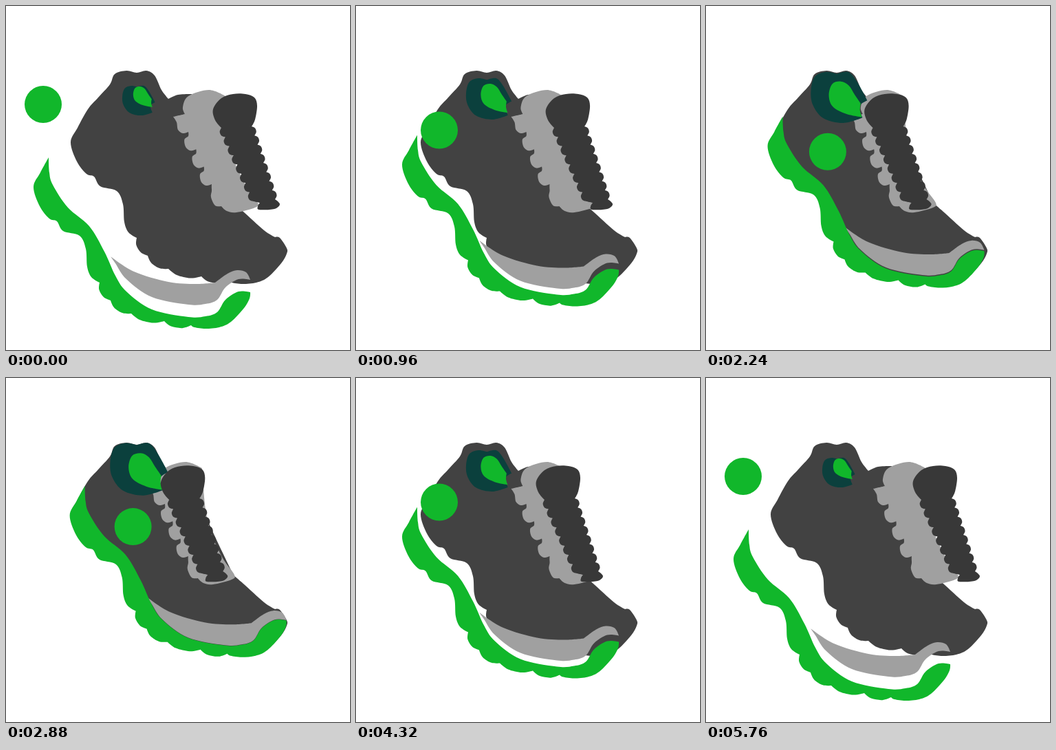
An HTML page with a canvas that plays this animation: 500 by 500 pixels, repeating every 5840 ms.

```html
<!DOCTYPE html>
<html lang="en">
<head>
<meta charset="utf-8">
<title>Running shoe assembly</title>
<style>
  html, body { margin: 0; width: 100%; height: 100%; overflow: hidden; background: #fff; }
  canvas { display: block; width: 100vw; height: 100vh; }
</style>
</head>
<body>
<canvas id="stage" width="500" height="500"></canvas>
<script>
const ctx = document.getElementById('stage').getContext('2d');
const STEP = 80, STEPS = 73, JOINED = 48, END = 72;
const GREEN = '#11b72b', TEAL = '#0b403d', GREY = '#a0a0a0', DARK = '#424242', TONGUE = '#383838';

const lerp = (a, b, u) => a + (b - a) * u;

// Key points are "x,y"; a trailing * marks a sharp corner.
function points(text) {
  return text.trim().split(/\s+/).map(s => {
    const [x, y] = s.replace('*', '').split(',').map(Number);
    return { x, y, corner: s.endsWith('*') };
  });
}

// Rounded bumps between neighbouring notches.
function bumps(notches, depth) {
  const out = [];
  notches.forEach((a, i) => {
    out.push({ ...a, corner: true });
    const b = notches[i + 1];
    if (!b) return;
    const dx = b.x - a.x, dy = b.y - a.y, k = depth / Math.hypot(dx, dy);
    for (const u of [0.28, 0.7]) out.push({ x: a.x + dx * u + dy * k, y: a.y + dy * u - dx * k });
  });
  return out;
}

function scallops(ends, count, depth) {
  const [a, b] = points(ends);
  const notches = Array.from({ length: count + 1 }, (_, i) =>
    ({ x: lerp(a.x, b.x, i / count), y: lerp(a.y, b.y, i / count) }));
  return bumps(notches, depth);
}

// One eyelet tab repeated down the lace panel.
function eyelets(x, y, count) {
  const tab = points('0,0 2,11 9,16 17,14* 17,20');
  return Array.from({ length: count }, (_, i) =>
    tab.map(p => ({ ...p, x: x + p.x + 11.3 * i, y: y + p.y + 25.3 * i }))).flat();
}

function outline(...parts) {
  const pts = parts.flat();
  const at = i => pts[(i + pts.length) % pts.length];
  const handle = (i, dir) => {
    const p = at(i), a = at(i - 1), b = at(i + 1), k = p.corner ? 0 : dir / 6;
    return [p.x + (b.x - a.x) * k, p.y + (b.y - a.y) * k];
  };
  const path = new Path2D();
  path.moveTo(pts[0].x, pts[0].y);
  pts.forEach((_, i) => {
    const end = at(i + 1);
    path.bezierCurveTo(...handle(i, 1), ...handle(i + 1, -1), end.x, end.y);
  });
  path.closePath();
  return path;
}

const tread = [
  ...points('104,177 94,198 103,226 117,244 128,248 137,262 161,269 170,288 172,314 178,329'),
  ...bumps(points('190,337 206,363 236,382 284,393 323,399'), -6),
  ...points('328,402 344,404 364,402 381,394 400,374 408,360')
];
const rim = points('409,351* 392,350 373,362 361,380 344,386 319,387 266,376 229,350 213,327');

const body = outline(tread, points(`408,352 398,337 391,336* 375,326 345,299 331,287*
  286,190 270,128* 250,129 236,135* 226,122 216,101 204,94 190,97 175,94 158,99 151,114
  134,133 119,150`));

const sole = outline(points('116,155*'), tread, rim, points('197,292 175,255 144,228 122,195 117,177'));

const toeCap = outline(rim, points('206,317* 240,339 290,354 330,357 358,355* 376,342 390,337 403,340'));

const lacePanel = outline(points('225,157* 208,161*'), eyelets(213, 169, 4),
  points(`264,269 263,278 269,290 278,291* 286,298 300,300 327,293 331,286 316,265 304,242
    297,225 289,190 284,131* 260,122 230,131 222,147`));

const collar = outline(points(`151,122 157,101 174,94 190,97* 207,94 220,108 236,137* 224,146
  229,163* 200,171 170,164 154,144`));

const lining = outline(points('178,130 183,113 196,109 208,115 217,129 226,142* 225,153 228,163* 204,158 184,147'));

const tongue = outline(points('223,150 235,134 252,128 270,128 283,133 287,145 284,165'),
  scallops('279,175 313,281', 8, 4), points('320,288 312,295 290,296 288,291 291,286*'),
  scallops('282,284 235,177', 8, 4.5), points('226,166'));

const badge = new Path2D();
badge.arc(188, 218, 27, 0, Math.PI * 2);

// Bezier ease with a quick start and a long tail, solved by bisection.
function ease(x) {
  if (x <= 0) return 0;
  if (x >= 1) return 1;
  let low = 0, high = 1, s;
  for (let i = 0; i < 30; i++) {
    s = (low + high) / 2;
    if (s * (1 - s) ** 2 + s ** 3 < x) low = s; else high = s;
  }
  return s * s * (3 - 2 * s);
}

// 1 when fully apart, 0 when joined.
function distance(step, start) {
  return step < JOINED
    ? 1 - ease((step - start) / (JOINED - start))
    : ease((step - JOINED) / (END - JOINED));
}

function place(path, color, dx = 0, dy = 0) {
  ctx.save();
  ctx.translate(dx, dy);
  ctx.fillStyle = color;
  ctx.fill(path);
  ctx.restore();
}

function grow(path, color, cx, cy, size) {
  ctx.save();
  ctx.translate(cx, cy);
  ctx.scale(size, size);
  place(path, color, -cx, -cy);
  ctx.restore();
}

function draw(step) {
  const apart = distance(step, 0);
  const size = 1 - 0.44 * apart;
  ctx.fillStyle = '#fff';
  ctx.fillRect(0, 0, 500, 500);
  place(body, DARK);
  place(lacePanel, GREY, 35 * apart);
  grow(collar, TEAL, 192, 144, size);
  grow(lining, GREEN, 193.5, 127, size);
  place(tongue, TONGUE, 78 * distance(step, 3));
  place(toeCap, GREY, -54 * apart, 47 * apart);
  place(sole, GREEN, -54 * apart, 65 * apart);
  place(badge, GREEN, -134 * apart, -75 * apart);
}

const start = performance.now();
function tick() {
  draw(Math.floor((performance.now() - start) / STEP) % STEPS);
  requestAnimationFrame(tick);
}
tick();
</script>
</body>
</html>
```
